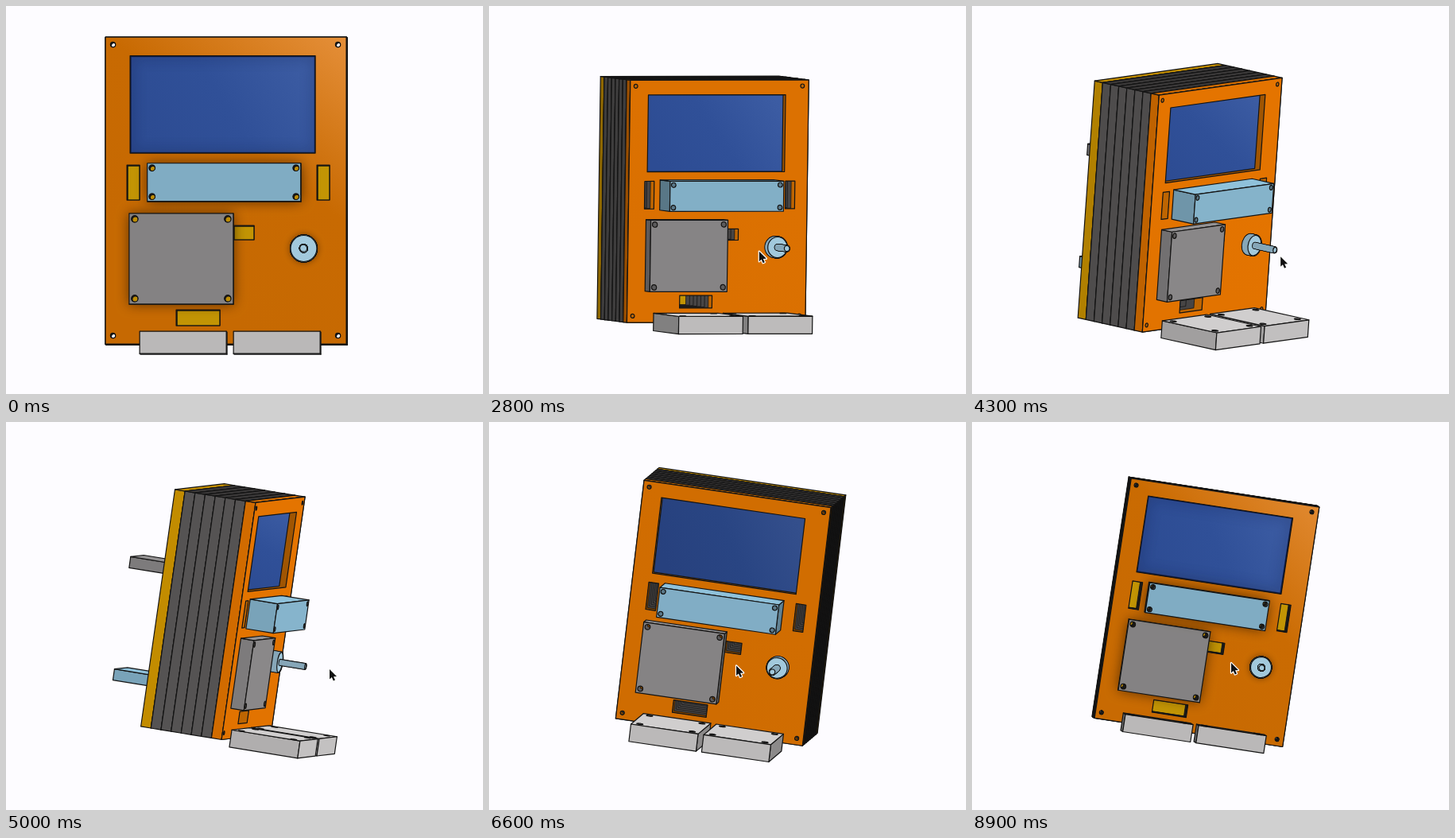
Animation of 600 by 488 pixels, one loop 9 s. Source, as an HTML page with a canvas:

```html
<!DOCTYPE html>
<html>
<head>
<meta charset="utf-8">
<style>
html, body { margin: 0; width: 600px; height: 488px; overflow: hidden; background: #fdfcff; }
canvas { display: block; }
</style>
</head>
<body>
<canvas id="stage" width="600" height="488"></canvas>
<script>
const c = document.getElementById('stage').getContext('2d');
const BG = '#fdfcff', INK = '#141414', LAYER = 17, BACK = -136;
const PIVOT = [348.5, 298, 10];

// time, yaw, pitch, roll
const TURN = [
  [1300, -.008, -.008, 0], [2000, 0, 0, 0], [2300, 0, 0, 0],
  [3000, .5, .06, .02], [3700, .641, .217, .037], [4100, .75, .21, .05],
  [5000, 1.313, .07, .143], [5200, 1.25, .07, .135], [5800, -.098, .068, .0455],
  [6000, -.2, .08, .055], [6400, -.2, .14, .1], [7000, -.07, .23, .156],
  [7300, -.0126, .164, .1564], [8000, .032, .014, .152]
];
// time, zoom, pivot x, pivot y
const VIEW = [
  [1300, 1, 348.5, 298], [1600, .944, 347, 297.3], [2000, .79, 342.7, 298.4],
  [3700, .791, 343.7, 297.5], [5000, .782, 338.5, 297.3], [5800, .793, 343, 300],
  [7300, .793, 343, 301.6], [8000, .79, 344, 300]
];
// time, x, y
const MOUSE = [
  [200, 640, 330], [300, 508, 322], [900, 322, 303], [2300, 322, 303], [3700, 372, 319],
  [5000, 407, 311], [5800, 312, 303], [6200, 306, 305], [7300, 320, 309], [8000, 326, 303]
];

const ORANGE = [200, 106, 2], SLAB = [90, 88, 88], YELLOW = [205, 148, 0];
const BLUE = [128, 172, 195], GREY = [132, 130, 131], SILVER = [186, 184, 184], STEEL = [150, 186, 204];
const PLATE = [125, 39, 428, 425];
const SCREEN = [156, 62.5, 389, 185];
const SLOTS = [[152, 200, 168, 244], [391, 200, 407, 244], [286, 276, 312, 294], [214, 382, 269, 402]];
const corners = (x0, y0, x1, y1) => [[x0, y0], [x1, y0], [x0, y1], [x1, y1]];
const SCREWS = corners(134.5, 48.5, 417.5, 414.5);

let axes, depth, pos, yaw, pitch, idle;

const mix = (a, b, k) => a.map((v, i) => v + (b[i] - v) * k);
const rgb = (col, k = 1) => `rgb(${col.map(v => Math.min(255, Math.round(v * k)))})`;

function sample(keys, t) {
  const i = keys.findIndex(k => t <= k[0]);
  if (i < 1) return keys.at(i).slice(1);
  const a = keys[i - 1], b = keys[i];
  return mix(a, b, (t - a[0]) / (b[0] - a[0])).slice(1);
}

function setCamera([w, p, r], [s, px, py]) {
  const { sin, cos } = Math;
  const turn = (x, y) => [s * (x * cos(r) - y * sin(r)), s * (x * sin(r) + y * cos(r))];
  axes = [turn(cos(w), -sin(w) * sin(p)), turn(0, cos(p)), turn(sin(w), cos(w) * sin(p))];
  depth = [-sin(w) * cos(p), -sin(p), cos(w) * cos(p)];
  pos = [px, py];
  yaw = w;
  pitch = p;
}

function at(...v) {
  return [0, 1].map(j => pos[j] + axes.reduce((sum, a, i) => sum + a[j] * (v[i] - PIVOT[i]), 0));
}

// Builds a path on the plane at depth z, facing front.
function onPlane(z, path, outside) {
  c.setTransform(...axes[0], ...axes[1], ...at(0, 0, z));
  c.beginPath();
  if (outside) c.rect(-2000, -2000, 5000, 5000);
  path();
  c.setTransform(1, 0, 0, 1, 0, 0);
}

const rectPath = ([x0, y0, x1, y1]) => () => c.rect(x0, y0, x1 - x0, y1 - y0);
const circlePath = (x, y, r) => () => { c.moveTo(x + r, y); c.arc(x, y, r, 0, 7); c.closePath(); };

function paint(fill, stroke = INK, width = 1.2) {
  if (fill) { c.fillStyle = fill; c.fill(); }
  if (stroke) { c.strokeStyle = stroke; c.lineWidth = width; c.stroke(); }
}

function quad(points, fill) {
  c.beginPath();
  points.forEach(p => c.lineTo(...at(...p)));
  c.closePath();
  paint(fill);
}

function box([x0, y0, z0, x1, y1, z1], col, right = .75, top = 1.12) {
  const left = yaw > 0, x = left ? x0 : x1, y = pitch > 0 ? y0 : y1;
  quad([[x, y0, z0], [x, y1, z0], [x, y1, z1], [x, y0, z1]],
    rgb(col, left ? .55 + .41 * Math.sin(yaw) : right));
  quad([[x0, y, z0], [x1, y, z0], [x1, y, z1], [x0, y, z1]], rgb(col, pitch > 0 ? top : .3));
  quad([[x0, y0, z1], [x1, y0, z1], [x1, y1, z1], [x0, y1, z1]], rgb(col, 1 + .05 * Math.abs(Math.sin(yaw))));
}

function shadow(path, blur) {
  if (!idle) return;
  c.save();
  c.shadowColor = 'rgba(40,20,0,.7)';
  c.shadowBlur = blur;
  onPlane(0, path);
  paint('#604020', null);
  c.restore();
}

// A bore looking down through the stacked layers.
function hole(path, top, floorZ, floor, body) {
  c.save();
  onPlane(top, path);
  c.clip();
  paint(floor, null);
  const stops = [];
  for (let z = floorZ; z < 0; z += LAYER) stops.push(z);
  if (top > 0) stops.push(0);
  for (const z of stops) {
    const wall = z < -LAYER ? '#474545' : z < 0 ? rgb(ORANGE, yaw > .3 ? .95 : .62) : rgb(body, .7);
    onPlane(z, path, true);
    c.fillStyle = wall;
    c.fill('evenodd');
    onPlane(z, path);
    paint(null, INK, .8);
  }
  c.restore();
  onPlane(top, path);
  paint(null);
}

function module(b, col, inset, r) {
  const [x0, y0, , x1, y1, z1] = b;
  shadow(rectPath([x0, y0, x1, y1]), 16);
  box(b, col);
  for (const [x, y] of corners(x0 + inset, y0 + inset, x1 - inset, y1 - inset))
    hole(circlePath(x, y, r), z1, BACK + LAYER, '#bd8c06', col);
}

function tray(x0, x1) {
  box([x0, 410, 3, x1, 438, 118], SILVER);
  if (pitch < .01) return;
  for (const [x, z] of corners(x0 + 12, 16, x1 - 12, 104)) {
    c.beginPath();
    for (let a = 0; a < 6.28; a += .4) c.lineTo(...at(x + 5 * Math.cos(a), 410, z + 5 * Math.sin(a)));
    c.closePath();
    paint('#555');
  }
}

function cylinder(x, y, r, z0, z1, col) {
  for (const outline of [true, false])
    for (let z = z0; z <= z1; z++) {
      onPlane(z, circlePath(x, y, r));
      paint(rgb(col, .9), outline ? INK : null, 2);
    }
  onPlane(z1, circlePath(x, y, r));
  paint(rgb(col, 1.08));
}

function knob() {
  shadow(circlePath(374.5, 305, 16.5), 10);
  cylinder(374.5, 305, 16.5, 0, 12, STEEL);
  cylinder(374.5, 305, 4.5, 12, 55, STEEL);
}

function gradient(from, to, stops) {
  const g = c.createLinearGradient(...at(...from), ...at(...to));
  stops.forEach((s, i) => g.addColorStop(i / (stops.length - 1), s));
  return g;
}

function body() {
  const [x0, y0, x1, y1] = PLATE;
  for (let i = 0; i < 8; i++) {
    const z = BACK + i * LAYER, col = i == 0 ? YELLOW : i == 7 ? ORANGE : SLAB;
    const edge = i == 7 && yaw > .2 ? mix(col, [226, 115, 0], .8) : col;
    box([x0, y0, z, x1, y1, z + LAYER], edge, .15, i == 0 || i == 7 ? .95 : .65);
  }
  const tilt = Math.min(1, Math.abs(yaw) / .5);
  const glow = Math.max(0, 1 - 5 * (Math.abs(yaw) + Math.abs(pitch)));
  const base = mix(ORANGE, [228, 116, 0], tilt);
  onPlane(0, rectPath(PLATE));
  paint(gradient([200, 330, 0], [428, 39, 0], [rgb(base, .99), rgb(base), rgb(mix(base, [232, 146, 62], glow))]));
}

function screen() {
  const path = rectPath(SCREEN), z = -11;
  c.save();
  onPlane(0, path);
  c.clip();
  paint(rgb(ORANGE, .8), null);
  onPlane(z, path);
  const k = pitch > .1 && yaw < .2 ? .86 : 1;
  paint(gradient([180, 180, z], [370, 62, z], [rgb([45, 76, 147], k), rgb([48, 80, 152], k), rgb([60, 92, 163], k)]));
  if (idle) {
    c.shadowColor = 'rgba(10,20,60,.9)';
    c.shadowBlur = 16;
    paint(null, 'rgba(10,20,60,.8)', 3);
  }
  c.restore();
  onPlane(0, path);
  paint(null);
}

function highlight() {
  const stroke = path => { onPlane(0, path); paint(null, '#ffd199', 1.5); };
  [PLATE, SCREEN, ...SLOTS, [194, 198, 357, 246]].forEach(r => stroke(rectPath(r)));
  SCREWS.forEach(([x, y]) => stroke(circlePath(x, y, 3.5)));
  stroke(circlePath(374.5, 305, 16.5));
  // Notched opening: each pair picks a column and a row.
  const xs = [160, 173, 270, 282], ys = [266, 276, 359, 370];
  stroke(() => {
    '10 20 21 31 32 22 23 13 12 02 01 11'.split(' ').forEach(([i, j]) => c.lineTo(xs[i], ys[j]));
    c.closePath();
  });
}

function cursor(x, y) {
  c.beginPath();
  [[0, 0], [0, 12.5], [2.8, 10], [4.8, 14.5], [7, 13.5], [5, 9.2], [9, 9]]
    .forEach(([dx, dy]) => c.lineTo(x + dx, y + dy));
  c.closePath();
  paint(null, '#fff', 2.4);
  paint('#111', null);
}

// Front parts with their centres, painted from far to near.
const PARTS = [
  { mid: [275, 222, 23], draw: () => module([178, 198, 0, 371, 246, 46], BLUE, 6, 3.8) },
  { mid: [220, 318, 11], draw: () => module([155, 261, 0, 286, 375, 22], GREY, 7, 4.2) },
  { mid: [374, 305, 10], draw: knob },
  { mid: [341, 424, 60], draw: () => tray(287, 396) },
  { mid: [223, 424, 60], draw: () => tray(169, 278) }
];

function draw(t) {
  setCamera(sample(TURN, t), sample(VIEW, t));
  idle = t < 1200 || t > 8300;
  c.fillStyle = BG;
  c.fillRect(0, 0, 600, 488);
  c.lineJoin = 'round';
  box([216, 164, -217, 296, 182, BACK], GREY);
  box([216, 347, -217, 296, 365, BACK], BLUE);
  body();
  screen();
  SLOTS.forEach(r => hole(rectPath(r), 0, BACK + LAYER, '#c29404'));
  SCREWS.forEach(([x, y]) => hole(circlePath(x, y, 3.2), 0, BACK, BG));
  const near = ({ mid }) => mid.reduce((sum, v, i) => sum + v * depth[i], 0);
  [...PARTS].sort((a, b) => near(a) - near(b)).forEach(part => part.draw());
  if (t >= 800 && t < 2300) highlight();
  cursor(...sample(MOUSE, t));
}

function tick() {
  draw(Math.floor(performance.now() % 9000 / 100) * 100);
  requestAnimationFrame(tick);
}
tick();
</script>
</body>
</html>
```
